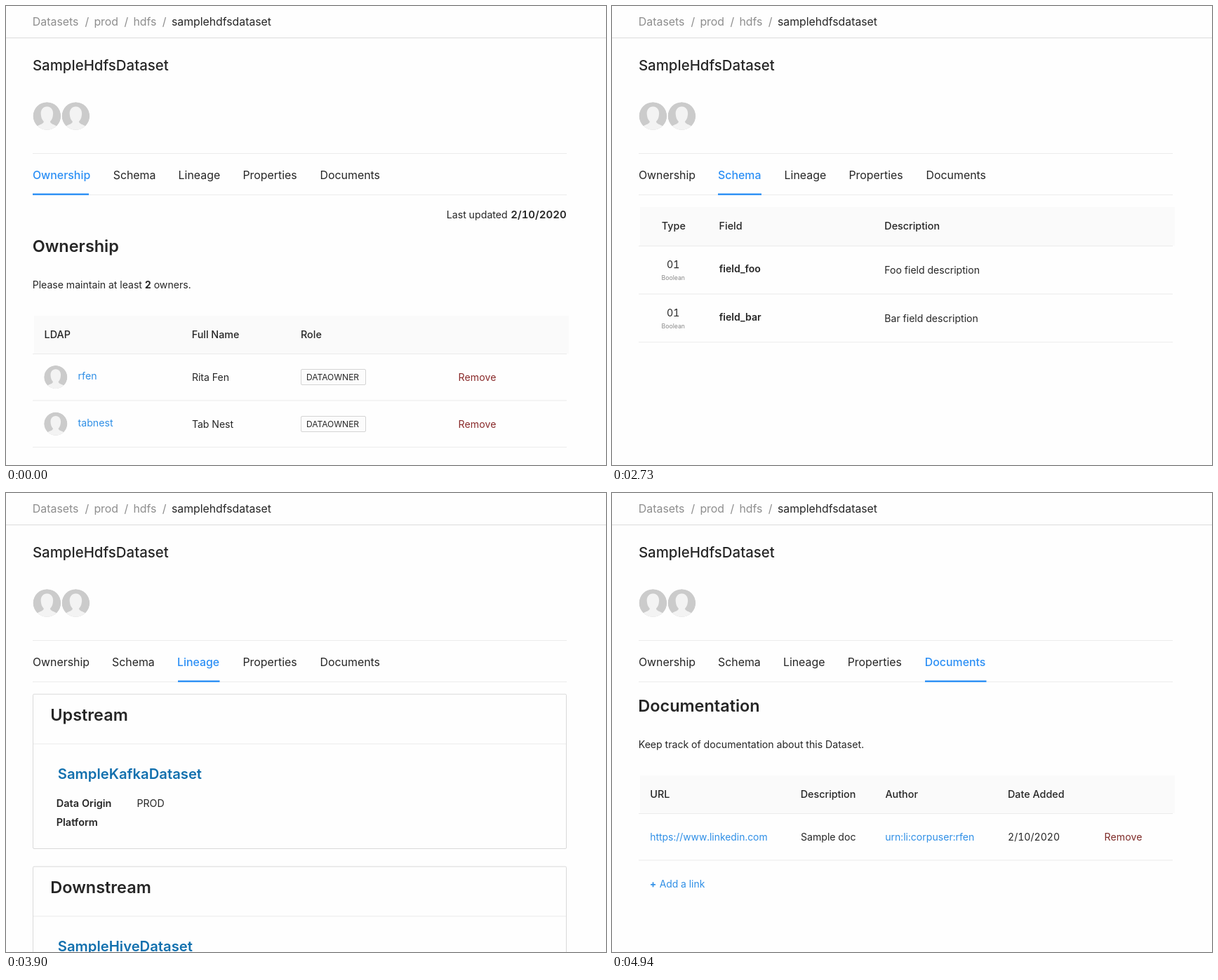
Animation, 855 px wide and 655 px high, one loop 5980 ms. Source, as an HTML page:

```html
<!DOCTYPE html>
<html lang="en">
<head>
<meta charset="utf-8">
<title>Dataset tabs</title>
<style>
  html, body { margin: 0; width: 100%; height: 100%; overflow: hidden; background: #fefefe; }
  svg { display: block; width: 855px; height: 655px; }
  text {
    font-family: Inter, "Open Sans", sans-serif;
    font-feature-settings: "tnum";
    white-space: pre;
  }
</style>
</head>
<body>
<svg id="stage" viewBox="0 0 855 655" xmlns="http://www.w3.org/2000/svg">
  <defs>
    <clipPath id="disc"><circle r="19.8"/></clipPath>
    <g id="avatar" clip-path="url(#disc)">
      <circle r="20" fill="#cbcbcb"/>
      <path fill="#f3f3f3" d="M-18 20C-17 12 -5 13 -4.5 8C-7.5 5 -8.5 1 -8.7 -3C-9 -9 -5.5 -13.5 0 -13.5S9 -9 8.7 -3C8.5 1 7.5 5 4.5 8C5 13 17 12 18 20Z"/>
    </g>
  </defs>
</svg>
<script>
const LOOP = 5980, STEP = 130;
const INK = '#262626', BLUE = '#2b8ff5', LINK = '#2f8fe6', RULE = '#ebebeb';
const stage = document.getElementById('stage');

function add(parent, tag, attrs, content) {
  const el = document.createElementNS(stage.namespaceURI, tag);
  for (const key in attrs) el.setAttribute(key, attrs[key]);
  if (content) el.textContent = content;
  parent.appendChild(el);
  return el;
}

const group = () => add(stage, 'g', {});

const text = (parent, x, y, content, size = 14.1, weight = 400, fill = INK, more = {}) =>
  add(parent, 'text', { x, y, 'font-size': size, 'font-weight': weight, fill, ...more }, content);

const rect = (parent, x, y, width, height, fill, more = {}) =>
  add(parent, 'rect', { x, y, width, height, fill, ...more });

const rule = (parent, y, fill = RULE, x = 38, width = 761) => rect(parent, x, y, width, 1, fill);

const avatar = (parent, x, y, scale = 1) =>
  add(parent, 'use', { href: '#avatar', transform: `translate(${x} ${y}) scale(${scale})` });

const heading = (parent, x, y, content) => text(parent, x, y, content, 23.45, 600);

// columns: pairs of x and label
function tableHead(parent, y, height, columns) {
  rect(parent, 40, y, 762, height, '#fafafa');
  rule(parent, y + height);
  for (const [x, label] of columns) text(parent, x, y + 31.6, label, 14.35, 500);
}

function drawHeader() {
  const g = group();
  const grey = '#8e8e8e';
  [[37.8, 'Datasets'], [112.4, '/'], [125.4, 'prod'], [168.4, '/'], [181.4, 'hdfs'], [222.8, '/']]
    .forEach(([x, s]) => text(g, x, 28.1, s, 15.9, 400, grey));
  text(g, 236, 28.1, 'samplehdfsdataset', 15.8);
  rule(g, 45, '#dcdcdc', 0, 855);
  text(g, 37.9, 91.8, 'SampleHdfsDataset', 20.45, 500);
  avatar(g, 58.4, 157);
  avatar(g, 99.4, 157);
  rule(g, 210);
  rule(g, 269);
}

function drawOwnership() {
  const g = group();
  text(g, 627.7, 302.8, 'Last updated', 14.2);
  text(g, 798.6, 302.8, '2/10/2020', 15, 600, INK, { 'text-anchor': 'end' });
  heading(g, 37.7, 351.2, 'Ownership');
  const note = text(g, 37.7, 403.4, 'Please maintain at least ');
  add(note, 'tspan', { 'font-weight': 700 }, '2');
  add(note, 'tspan', {}, ' owners.');
  tableHead(g, 442, 54, [[54.6, 'LDAP'], [264.7, 'Full Name'], [420, 'Role']]);
  const owners = [['rfen', 'Rita Fen'], ['tabnest', 'Tab Nest']];
  g.removers = owners.map(([user, name], i) => {
    const dy = i * 66.6;
    avatar(g, 70.8, 529.6 + dy, 0.835);
    text(g, 102.5, 532.9 + dy, user, 14.2, 400, LINK);
    text(g, 264.9, 535.1 + dy, name);
    rect(g, 420.5, 518.5 + Math.round(dy), 92, 22, '#fcfcfc', { stroke: '#d4d4d4', rx: 1.5 });
    text(g, 428, 534.1 + dy, 'DATAOWNER', 12);
    rule(g, 562.5 + dy);
    return text(g, 644.6, 535.1 + dy, 'Remove', 14.2);
  });
  return g;
}

function drawSchema() {
  const g = group();
  tableHead(g, 287, 55, [[70.8, 'Type'], [152.6, 'Field'], [388.3, 'Description']]);
  ['foo', 'bar'].forEach((name, i) => {
    const dy = i * 68.8;
    text(g, 87.3, 374.2 + dy, '01', 14.2, 400, INK, { 'text-anchor': 'middle' });
    rect(g, 88.5, 373.2 + dy, 6.5, 1, INK);
    text(g, 87.3, 391.3 + dy, 'Boolean', 8.7, 400, '#888', { 'text-anchor': 'middle' });
    text(g, 152.7, 379.8 + dy, 'field_' + name, 14.1, 600);
    const title = name[0].toUpperCase() + name.slice(1);
    text(g, 388.3, 382.1 + dy, title + ' field description');
    rule(g, 410.5 + dy);
  });
  return g;
}

function drawLineage() {
  const g = group();
  [['Upstream', 'SampleKafkaDataset'], ['Downstream', 'SampleHiveDataset']].forEach(([title, name], i) => {
    const dy = i * 246;
    rect(g, 38.5, 287.1 + dy, 760, 220.4, '#fefefe', { stroke: '#d9d9d9', rx: 1.5 });
    rule(g, 357.5 + dy, RULE, 39, 759);
    heading(g, 63.3, 325.3 + dy, title);
    text(g, 73.8, 407.7 + dy, name, 20.25, 600, '#1270ae');
    text(g, 71.7, 447.7 + dy, 'Data Origin', 14.5, 600);
    text(g, 186.4, 447.7 + dy, 'PROD', 14.2);
    text(g, 71.7, 475.4 + dy, 'Platform', 14.5, 600);
  });
  return g;
}

function drawDocuments() {
  const g = group();
  heading(g, 37.3, 312.2, 'Documentation');
  text(g, 37.7, 364.4, 'Keep track of documentation about this Dataset.', 14.15);
  tableHead(g, 403, 54, [[54.3, 'URL'], [268.7, 'Description'], [389.4, 'Author'], [564, 'Date Added']]);
  text(g, 54.3, 496.1, 'https://www.linkedin.com', 13.9, 400, LINK);
  text(g, 269, 496.1, 'Sample doc');
  text(g, 389.2, 496.1, 'urn:li:corpuser:rfen', 14.1, 400, LINK);
  text(g, 564, 496.1, '2/10/2020', 14.1);
  text(g, 701.6, 496.1, 'Remove', 14.2, 400, '#7f2c29');
  rule(g, 523.5);
  text(g, 54, 562.8, '+', 14, 700, LINK);
  text(g, 67.7, 562.8, 'Add a link', 13.95, 400, LINK);
  return g;
}

drawHeader();
const panels = [drawOwnership(), drawSchema(), drawLineage(), null, drawDocuments()];

// on / off: when a label starts turning blue and dark again
const tabs = [
  { label: 'Ownership', x: 37.9, on: -999, off: 2210 },
  { label: 'Schema', x: 151, on: 1690, off: 3380 },
  { label: 'Lineage', x: 243.9, on: 3120, off: 4550 },
  { label: 'Properties', x: 335.7, on: 1e6, off: 1e6 },
  { label: 'Documents', x: 445.8, on: 4290, off: 1e6 }
];
const tabBar = group();
for (const tab of tabs) tab.el = text(tabBar, tab.x, 246.6, tab.label, 15.9);
const bar = rect(tabBar, 38, 267.5, 80, 2.4, BLUE);

const barSpots = [[38, 80], [151, 62], [245, 59.5], null, [446, 87.5]];
// start: bar motion; panel: content swap; label: weight change
const moves = [
  { from: 0, to: 1, start: 2105, panel: 2210, label: 2340 },
  { from: 1, to: 2, start: 3360, panel: 3510, label: 3510 },
  { from: 2, to: 4, start: 4540, panel: 4680, label: 4680 }
];

const clamp = v => Math.max(0, Math.min(1, v));
const lerp = (a, b, k) => a + (b - a) * k;
const fade = (t, start) => clamp((t - start) / 160);
const channel = (hex, i) => parseInt(hex.substr(1 + i * 2, 2), 16);
const mix = (a, b, k) => `rgb(${[0, 1, 2].map(i => Math.round(lerp(channel(a, i), channel(b, i), k)))})`;

// cubic-bezier(.645, .045, .355, 1)
function ease(p) {
  const bez = (s, a, b) => 3 * (1 - s) * (1 - s) * s * a + 3 * (1 - s) * s * s * b + s * s * s;
  let lo = 0, hi = 1;
  for (let i = 0; i < 20; i++) {
    const mid = (lo + hi) / 2;
    if (bez(mid, 0.645, 0.355) < p) lo = mid; else hi = mid;
  }
  return bez(hi, 0.045, 1);
}

function render(now) {
  const t = Math.floor((now % LOOP) / STEP) * STEP;
  let shown = 0, active = 0, left = barSpots[0][0], width = barSpots[0][1];
  for (const m of moves) {
    if (t >= m.panel) shown = m.to;
    if (t >= m.label) active = m.to;
    if (t >= m.start) {
      const k = ease(clamp((t - m.start) / 300));
      const a = barSpots[m.from], b = barSpots[m.to];
      left = lerp(a[0], b[0], k);
      width = lerp(a[1], b[1], k);
    }
  }
  panels.forEach((g, i) => g && g.setAttribute('display', i === shown ? 'inline' : 'none'));
  for (const el of panels[0].removers) el.setAttribute('fill', t < 1820 ? '#8a2b2b' : '#b3261f');
  bar.setAttribute('x', left);
  bar.setAttribute('width', width);
  tabs.forEach((tab, i) => {
    const blue = fade(t, tab.on) * (1 - fade(t, tab.off));
    tab.el.setAttribute('x', tab.x + (i > active ? 1.7 : 0));
    tab.el.setAttribute('font-weight', i === active ? 500 : 400);
    tab.el.setAttribute('fill', mix(INK, BLUE, blue));
  });
}

function tick() {
  render(performance.now());
  requestAnimationFrame(tick);
}
tick();
</script>
</body>
</html>
```
